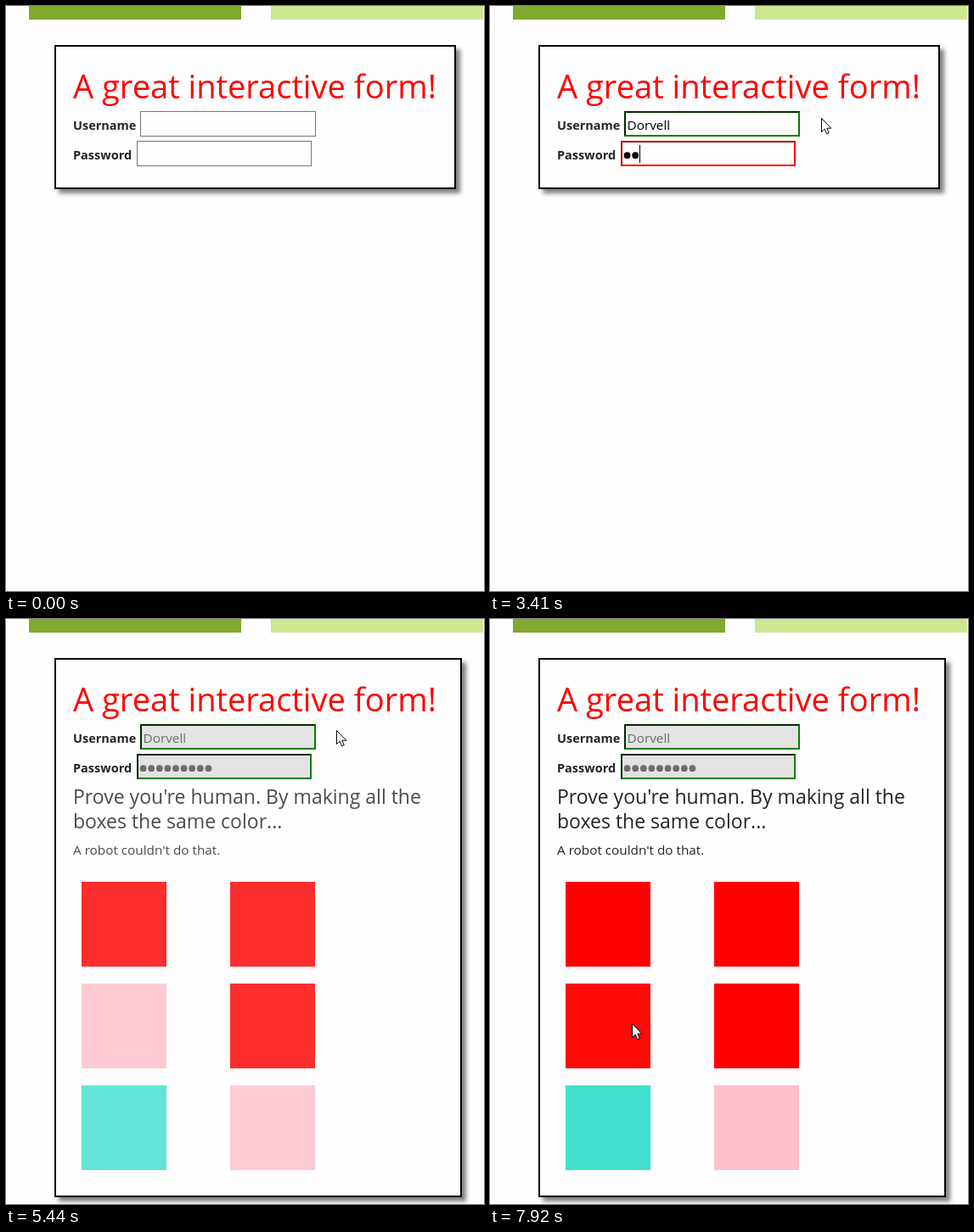
Animation, 563 px wide and 690 px high, one loop 8 s. Source, as an HTML page:

```html
<!DOCTYPE html>
<html lang="en">
<head>
<meta charset="utf-8">
<title>Interactive form</title>
<style>
html, body { margin: 0; width: 100%; height: 100%; overflow: hidden; background: #fefefe; }
div, svg { position: absolute; box-sizing: border-box; }
.bar { top: 0; width: 250px; height: 16px; }
#form { left: 57px; top: 46px; border: 2px solid #000; background: #fefefe; box-shadow: 5px 5px 5px gray; }
.field { height: 30px; border: 1px solid #767676; }
.hover { border-color: #4f4f4f; }
.bad { border: 2px inset red; }
.good { border: 2px inset green; }
.off { background: #e3e3e3; }
svg { left: 0; top: 0; }
text { font: 15.3px "Open Sans", "Noto Sans", sans-serif; fill: #212529; }
.title { font-size: 38.1px; fill: red; }
.label { font-size: 14.5px; font-weight: 700; }
.lead { font-size: 23px; }
</style>
</head>
<body>
<div class="bar" style="left:27px;background:#7fa92f"></div>
<div class="bar" style="left:312px;background:#cee793"></div>
<div id="form"></div>
<div id="user" class="field" style="left:158px;top:124px;width:207px"></div>
<div id="pass" class="field" style="left:154px;top:159px;width:206px"></div>
<svg width="563" height="690">
  <text class="title" x="79" y="109">A great interactive form!</text>
  <text class="label" x="79" y="146">Username</text>
  <text class="label" x="79" y="181">Password</text>
  <text id="name" x="161.5" y="146"></text>
  <g id="dots"></g>
  <rect id="caret" width="1" height="21"/>
  <g id="panel">
    <text class="lead" x="79" y="218">Prove you're human. By making all the</text>
    <text class="lead" x="79" y="247">boxes the same color...</text>
    <text x="79" y="278">A robot couldn't do that.</text>
    <g id="boxes"></g>
  </g>
  <path id="arrow" d="M.5 .5V16.5L4.2 13.2 6.6 18.8 9.2 17.7 6.8 12.2H11.8Z" fill="#fff" stroke="#000"/>
  <path id="beam" d="M-3 -8H3M0 -8V8M-3 8H3" stroke="#000" fill="none"/>
</svg>
<script>
const LOOP = 8000, TICK = 77.7, FIRST = 150;
const NAME = "Dorvell";
const $ = id => document.getElementById(id);

// Step schedules: [time, value]
const typed = [[0, 0], [1860, 1], [2170, 2], [2320, 3], [2400, 5], [2550, 6], [2630, 7]];
const secret = [[0, 0], [3260, 1], [3410, 2], [3640, 3], [3790, 4], [3960, 5], [4110, 6], [4190, 7], [4340, 8], [4570, 9]];
const userState = [[0, ""], [1940, "bad"], [2400, "good"], [5200, "good off"]];
const passState = [[0, ""], [2950, "bad"], [4040, "good"], [5200, "good off"]];
const focus = [[0, ""], [1860, "user"], [2870, "pass"], [5030, ""]];
const clicks = [[0, "pink"], [6740, "turquoise"], [6931, "pink"], [7440, "red"], [7600, "turquoise"], [7832, "red"]];
// Pointer path: [time, x, y]
const path = [[150, 382, 530], [610, 262, 138], [700, 262, 138], [930, 300, 176], [1160, 420, 172],
  [1390, 390, 132], [4260, 390, 132], [4340, 389, 131], [6060, 389, 131], [6680, 167, 477]];

function add(parent, tag, attrs) {
  const el = document.createElementNS("http://www.w3.org/2000/svg", tag);
  for (const k in attrs) el.setAttribute(k, attrs[k]);
  return $(parent).appendChild(el);
}

const dots = Array.from({ length: 9 }, (_, i) =>
  add("dots", "circle", { cx: 161.6 + 9.6 * i, cy: 176.2, r: 3.9 }));
const boxes = ["red", "red", "pink", "red", "turquoise", "pink"].map((fill, i) =>
  add("boxes", "rect", { x: 89 + 175 * (i % 2), y: 310 + 120 * (i >> 1), width: 100, height: 100, fill }));

const last = (list, t) => list.filter(s => s[0] <= t).pop();
const at = (list, t) => last(list, t)[1];

function swing(t, start, length) {
  const p = Math.min(1, Math.max(0, (t - start) / length));
  return 0.5 - Math.cos(p * Math.PI) / 2;
}

function pointer(t) {
  const i = path.findIndex(k => k[0] > t);
  if (i < 0) return path[path.length - 1].slice(1);
  const b = path[i], a = path[i - 1] || b;
  const p = swing(t, a[0], b[0] - a[0] || 1);
  return [a[1] + (b[1] - a[1]) * p, a[2] + (b[2] - a[2]) * p];
}

function setField(id, state, x, y) {
  const el = $(id), l = el.offsetLeft, u = el.offsetTop;
  const over = x >= l && x < l + el.offsetWidth && y >= u && y < u + 30;
  el.className = "field " + (state || (over ? "hover" : ""));
  return over;
}

function show(el, on) { el.style.display = on ? "" : "none"; }

function draw(t) {
  // Continuous motion advances on coarse ticks
  const q = Math.max(0, FIRST + Math.floor((t - FIRST + 12) / TICK) * TICK);
  const open = t >= 5200;
  $("form").style.width = (open ? 480 : 473) + "px";
  $("form").style.height = (open ? 636 : 170) + "px";

  const [x, y] = pointer(q).map(Math.round);
  const overUser = setField("user", at(userState, t), x, y);
  const overPass = setField("pass", at(passState, t), x, y);
  const inField = overUser || overPass;
  show($("arrow"), t >= FIRST && !inField);
  show($("beam"), t >= FIRST && inField);
  for (const id of ["arrow", "beam"]) $(id).setAttribute("transform", `translate(${x} ${y})`);

  const ink = open ? "#6d6d6d" : "#000";
  const count = at(secret, t), where = at(focus, t);
  $("name").textContent = NAME.slice(0, at(typed, t));
  $("name").style.fill = ink;
  $("dots").setAttribute("fill", ink);
  dots.forEach((d, i) => show(d, i < count));

  const end = where === "user" ? 162 + $("name").getComputedTextLength() : 157 + 9.6 * count;
  $("caret").setAttribute("x", Math.round(end));
  $("caret").setAttribute("y", where === "user" ? 129 : 164);
  show($("caret"), where);

  show($("panel"), open);
  $("panel").setAttribute("opacity", swing(q, 5167, 370));
  const [since, color] = last(clicks, q);
  boxes[2].setAttribute("fill", color);
  boxes[2].setAttribute("opacity", since ? swing(q, since, 100) : 1);
}

const start = performance.now();
function frame() {
  draw(Math.max(0, performance.now() - start) % LOOP);
  requestAnimationFrame(frame);
}
frame();
</script>
</body>
</html>
```
